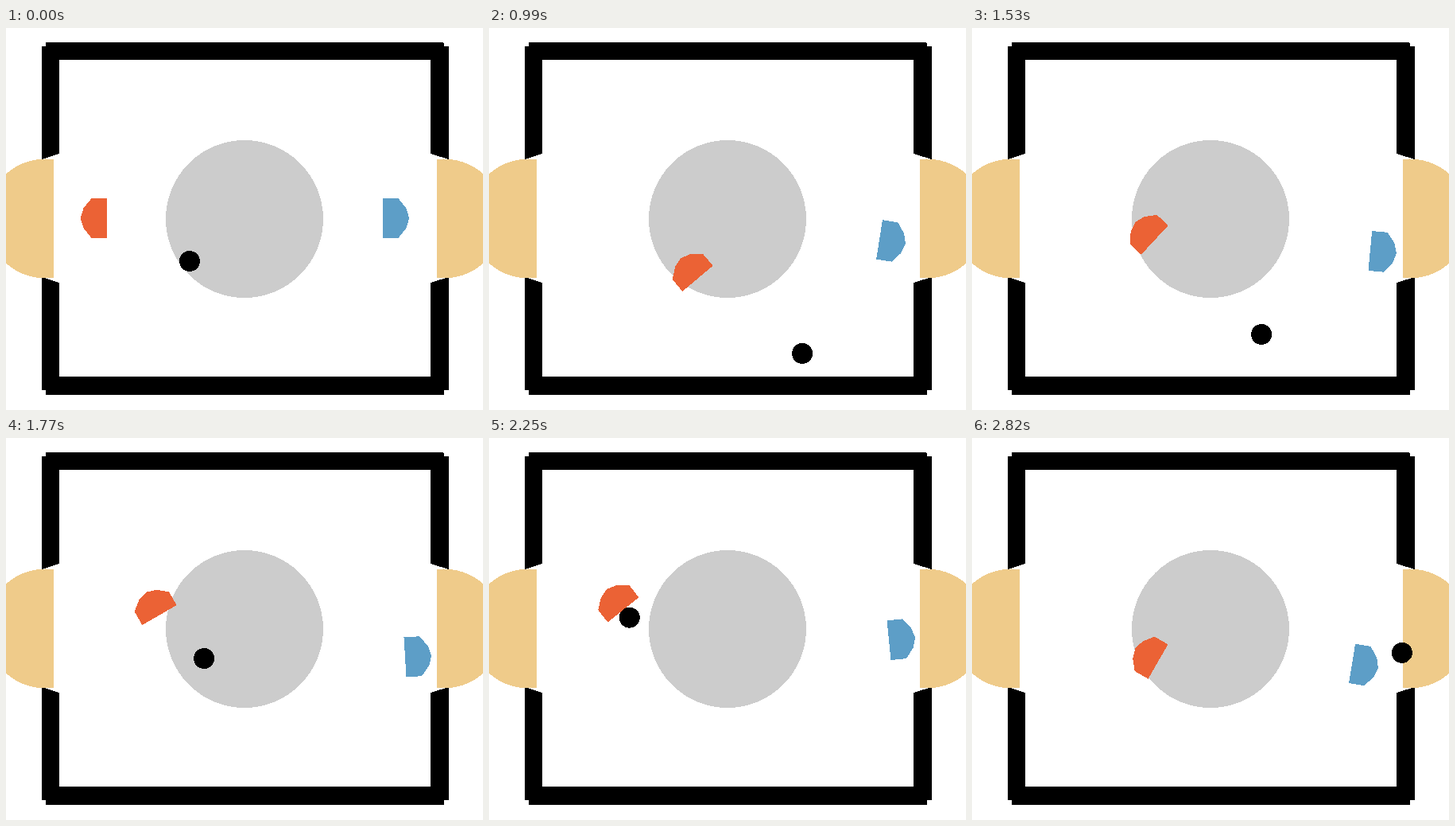
An HTML page for the animation above (2850 ms loop, 600x480 px).

```html
<!DOCTYPE html>
<html lang="en">
<head>
<meta charset="utf-8">
<title>Table hockey</title>
<style>
  html, body { margin: 0; width: 100%; height: 100%; overflow: hidden; background: #fff; }
  svg { display: block; width: 600px; height: 480px; shape-rendering: crispEdges; }
  .racket { stroke-width: 2; }
  #red { fill: #eb6235; stroke: #eb6235; }
  #blue { fill: #5d9ec7; stroke: #5d9ec7; }
</style>
</head>
<body>
<svg viewBox="0 0 600 480">
  <circle cx="300" cy="240" r="99" fill="#ccc"/>
  <g id="walls">
    <path d="M50 18H549L551 20V40H50Z"/>
    <path d="M50 438H551V461H50Z"/>
    <path d="M45 23H67V158L45 165Z"/>
    <path d="M45 313L67 320V455H45Z"/>
    <path d="M557 23H534V158L557 165Z"/>
    <path d="M557 313L534 320V455H557Z"/>
  </g>
  <g id="goals" fill="#efcb8a">
    <path d="M60 165.2A75 75 0 1 0 60 313.8Z"/>
    <path d="M542 165A75 75 0 1 1 542 314Z"/>
  </g>
  <polygon id="red" class="racket" points="-12,24 6,24 6,-24 -12,-24 -21.6,-12 -25.2,0 -21.6,12"/>
  <polygon id="blue" class="racket" points="12,24 -6,24 -6,-24 12,-24 21.6,-12 25.2,0 21.6,12"/>
  <circle id="puck" r="13"/>
</svg>
<script>
const LOOP = 2850, STEP = 30;
const CATCH = 1920, SHOT = 2280;
const FLOOR = 425;    // lowest puck centre
const REACH = 19.5;   // racket centre to a puck on its face

// Key poses: time, x, y, angle in degrees
const redKeys = [
  [0, 120, 239, 0], [510, 213, 292.5, 43], [990, 258, 309.5, 50],
  [1290, 253.5, 302, 29], [1770, 189.5, 216.5, 60], [2030, 149, 184, 58],
  [2250, 164.6, 210.4, 51.5], [2550, 214, 266, 36], [2820, 228, 277.5, 30]
];
const blueKeys = [
  [0, 481, 239, 0], [510, 504.5, 257, -5.8], [990, 498, 267, 9],
  [1290, 505.5, 281.5, 13.5], [1770, 509, 275, -3.5],
  [2250, 510, 253.5, -5.7], [2820, 485, 284.5, 9.3]
];

// Smooth cubic through the key poses, at rest at both ends
function poseAt(keys, t) {
  const last = keys.length - 1;
  const next = keys.findIndex(k => k[0] > t);
  const i = next < 0 ? last - 1 : next - 1;
  const a = keys[i], b = keys[i + 1], h = b[0] - a[0];
  const u = Math.min(1, (t - a[0]) / h), v = 1 - u;
  const slope = (k, j) => {
    if (k === 0 || k === last) return 0;
    const p = keys[k - 1], q = keys[k + 1];
    return (q[j] - p[j]) / (q[0] - p[0]);
  };
  return [1, 2, 3].map(j =>
    a[j] * (1 + 2 * u) * v * v + b[j] * (1 + 2 * v) * u * u +
    h * u * v * (slope(i, j) * v - slope(i + 1, j) * u));
}

// Puck resting against the middle of the red face
function heldAt(t) {
  const [x, y, deg] = poseAt(redKeys, t), r = deg * Math.PI / 180;
  return [x + REACH * Math.cos(r), y + REACH * Math.sin(r)];
}

// Each flight: time, x, y, speed in px per ms
const flights = [
  [0, 231, 293, 0, 0],
  [510, 239, 298, 0.323, 0.298],
  [1290, 479, 357, -0.479, 0.45],
  [SHOT, ...heldAt(SHOT), 0.67, 0.735],
  [2543, 358, FLOOR, 0.66, -0.56]
];

function puckAt(t) {
  if (t >= CATCH && t < SHOT) return heldAt(t);
  const [t0, x, y, vx, vy] = flights.findLast(f => f[0] <= t);
  const d = t - t0;
  return [x + vx * d, FLOOR - Math.abs(FLOOR - y - vy * d)];
}

const [red, blue, puck] = ['red', 'blue', 'puck'].map(id => document.getElementById(id));

function place(el, [x, y, deg = 0]) {
  el.setAttribute('transform', `translate(${x.toFixed(2)} ${y.toFixed(2)}) rotate(${deg.toFixed(2)})`);
}

function draw(t) {
  place(red, poseAt(redKeys, t));
  place(blue, poseAt(blueKeys, t));
  place(puck, puckAt(t));
}

const start = performance.now();
function tick() {
  const t = (performance.now() - start) % LOOP;
  draw(Math.floor(t / STEP) * STEP);
  requestAnimationFrame(tick);
}
tick();
</script>
</body>
</html>
```
